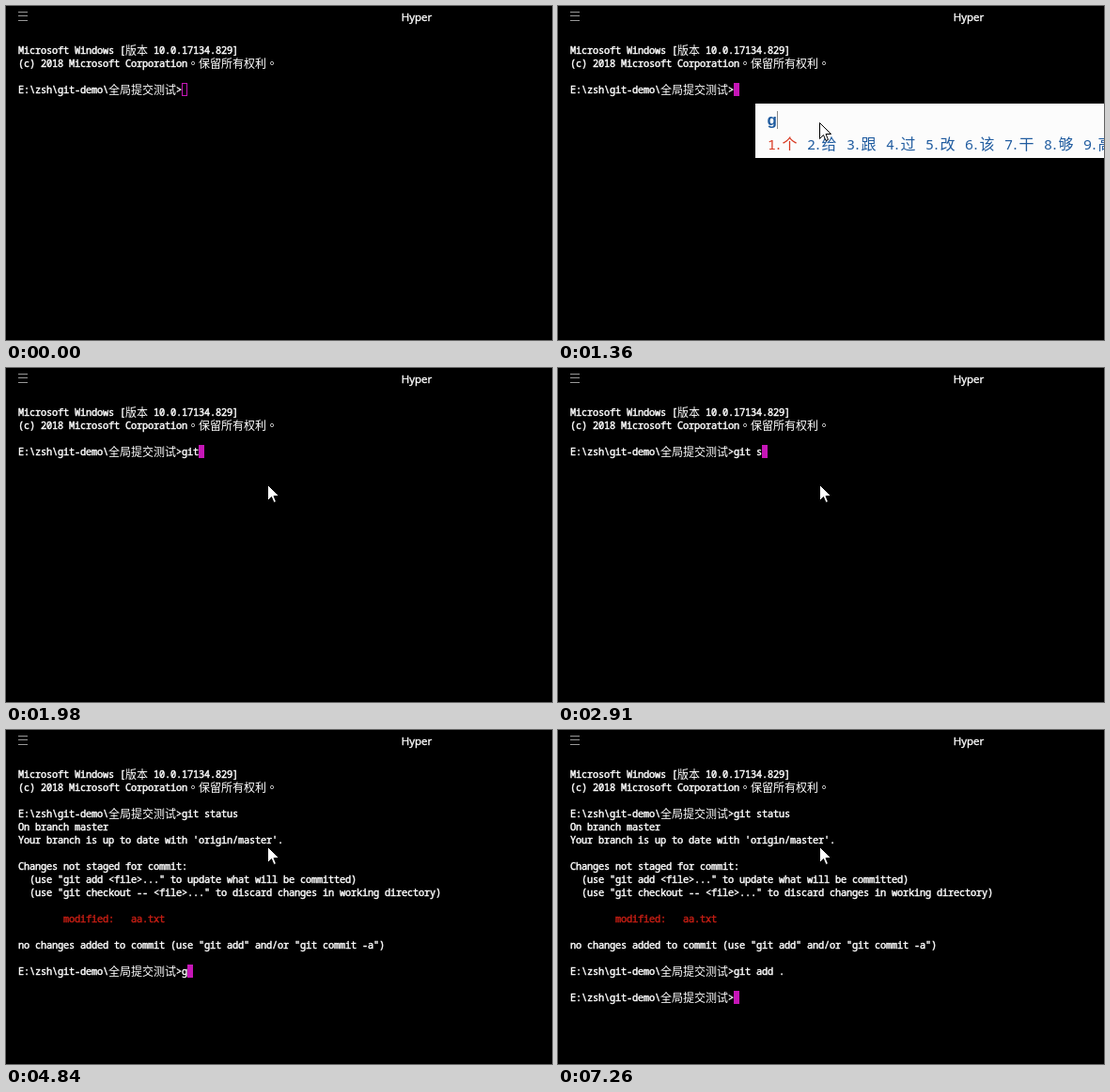
Recreate the animation shown at these times as an HTML page with a canvas. Size 581 by 356 pixels, loop 8000 ms.

```html
<!DOCTYPE html>
<html lang="zh-CN">
<head>
<meta charset="utf-8">
<title>Terminal</title>
<style>
  html, body { margin: 0; width: 100%; height: 100%; overflow: hidden; background: #000; }
  canvas { display: block; }
</style>
</head>
<body>
<canvas id="stage" width="581" height="356"></canvas>
<script>
const ctx = document.getElementById('stage').getContext('2d');
const LOOP = 8000, LEFT = 13, TOP = 40, CELL = 6, ROW = 14, PROMPT_COLS = 29;
const CJK = '"Noto Sans CJK SC", "Noto Sans CJK", sans-serif';
const CJK_CENTERED_STOP = '"Noto Sans CJK TC", "Noto Sans CJK", sans-serif';
const MONO = '10.3px "Noto Sans Mono", monospace';
const WHITE = '#fff', RED = '#c51e14', BLUE = '#1f5b9f', CURSOR = '#c616b7';

const prompt = 'E:\\zsh\\git-demo\\全局提交测试>';
const banner = [
  'Microsoft Windows [版本 10.0.17134.829]',
  '(c) 2018 Microsoft Corporation。保留所有权利。'
];
const statusOutput = [
  'On branch master',
  "Your branch is up to date with 'origin/master'.",
  '',
  'Changes not staged for commit:',
  '  (use "git add <file>..." to update what will be committed)',
  '  (use "git checkout -- <file>..." to discard changes in working directory)',
  '',
  '        modified:   aa.txt',
  '',
  'no changes added to commit (use "git add" and/or "git commit -a")'
];

// Each command: the time at which every character appears, then Enter and its result.
const commands = [
  { row: 3, text: 'git status', keys: [1980, 1980, 1980, 2130, 2910, 3080, 3230, 3460, 3610, 3770],
    enter: 4000, done: 4080 },
  { row: 15, text: 'git add .', keys: [4840, 4920, 5000, 5150, 5620, 5850, 6090, 6250, 6720],
    enter: 7180, done: 7260 },
  { row: 17, text: '', keys: [], enter: Infinity, done: Infinity }
];

const inputSteps = [
  { at: 1360, typed: 'g', words: '个给跟过改该干够高' },
  { at: 1440, typed: 'gi', words: '给个该跟过改干够高' },
  { at: 1520, typed: 'git', words: '给个该跟过改干够高' }
];
const INPUT_END = 1980;

function rect(x, y, w, h, color) {
  ctx.fillStyle = color;
  ctx.fillRect(x, y, w, h);
}

// A thin stroke of the same colour thickens the letters.
function label(text, x, y, font, color, { align = 'left', weight = 0 } = {}) {
  ctx.font = font;
  ctx.fillStyle = ctx.strokeStyle = color;
  ctx.textAlign = align;
  ctx.fillText(text, x, y);
  if (weight) {
    ctx.lineWidth = weight;
    ctx.strokeText(text, x, y);
  }
}

// Terminal text on a fixed grid; Chinese characters take two cells.
function line(text, row, color = WHITE) {
  const baseline = TOP + row * ROW + 11;
  let x = LEFT;
  for (const ch of text) {
    const wide = ch > '\u2e7f';
    if (wide) label(ch, x, baseline + 1, `12px ${ch === '。' ? CJK_CENTERED_STOP : CJK}`, color);
    else label(ch, x, baseline, MONO, color, { weight: .45 });
    x += wide ? 2 * CELL : CELL;
  }
}

function caret(col, row, focused) {
  const x = LEFT + col * CELL, y = TOP + row * ROW;
  rect(x, y, CELL, ROW, CURSOR);
  if (!focused) rect(x + 1, y + 1, CELL - 2, ROW - 2, '#000');
}

function titleBar(t) {
  for (const y of [6, 10, 15]) rect(13, y, 10, 1, '#999');
  const title = t >= 7180 && t < 7260 ? 'git\u00a0 add .' : 'Hyper';
  label(title, 437, 16, '11.5px "Open Sans", sans-serif', WHITE, { align: 'center', weight: .4 });
}

function terminal(t) {
  banner.forEach((text, i) => line(text, i));
  if (t >= 4080) {
    statusOutput.forEach((text, i) => line(text, 4 + i, text.includes('modified:') ? RED : WHITE));
  }
  let start = 0;
  for (const { row, text, keys, enter, done } of commands) {
    if (t < start) break;
    const count = keys.filter(k => t >= k).length;
    line(prompt + text.slice(0, count), row);
    if (t < enter) caret(PROMPT_COLS + count, row, t >= 600);
    else if (t < done) caret(0, row + 1, true);
    start = done;
  }
}

function inputPanel(t) {
  if (t < inputSteps[0].at || t >= INPUT_END) return;
  const { typed, words } = inputSteps.filter(s => t >= s.at).pop();
  rect(210, 104, 371, 58, '#fcfcfc');
  label(typed, 222.5, 127, 'bold 17px "Liberation Sans", sans-serif', BLUE);
  rect(Math.round(223 + ctx.measureText(typed).width), 112, 1, 19, '#888');
  [...words].forEach((word, i) => {
    const x = 224 + i * 42, color = i ? BLUE : '#d8361e';
    label(i + 1, x - 1, 153, '15px "Noto Sans Mono", monospace', color);
    label('.', x + 6, 153, '15px "Noto Sans Mono", monospace', color);
    label(word, x + 14.5, 153, `300 16px ${CJK}`, color);
  });
}

function pointer(t) {
  if (t < 70) return;
  const p = Math.min(1, Math.floor((t - 70) / 76) / 6);
  const rest = (1 - p) ** 2;
  ctx.save();
  ctx.translate(Math.round(278 + 196 * rest) + .5, Math.round(124 + 221 * rest) + .5);
  ctx.fillStyle = WHITE;
  ctx.strokeStyle = '#000';
  ctx.lineWidth = 1;
  const arrow = new Path2D('M0 0V17L4 13L6.5 19L9 18L6.5 12H12Z');
  ctx.fill(arrow);
  ctx.stroke(arrow);
  ctx.restore();
}

function draw(now) {
  const t = now % LOOP;
  rect(0, 0, 581, 356, '#000');
  titleBar(t);
  terminal(t);
  inputPanel(t);
  pointer(t);
  requestAnimationFrame(draw);
}
requestAnimationFrame(draw);
</script>
</body>
</html>
```
